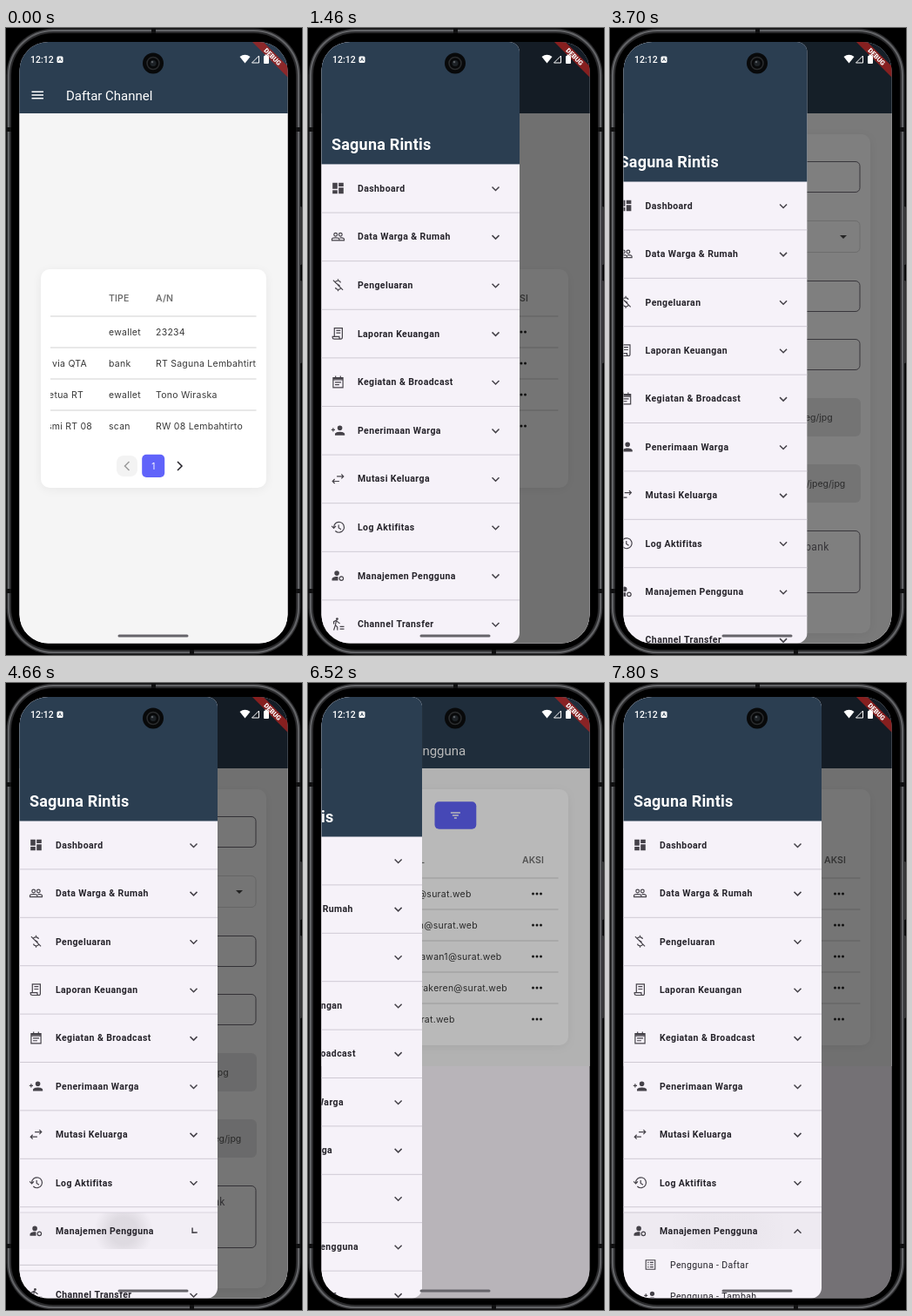
Recreate the animation shown at these times as an HTML page with a canvas. Size 340 by 720 pixels, loop 8 s.

```html
<!DOCTYPE html>
<html lang="id">
<head>
<meta charset="utf-8">
<style>
html, body { margin: 0; width: 100%; height: 100%; overflow: hidden; background: #000; }
canvas { display: block; width: 340px; height: 720px; }
</style>
</head>
<body>
<canvas id="stage"></canvas>
<script>
const LOOP = 8000;
const canvas = document.getElementById('stage');
const c = canvas.getContext('2d');
const dpr = window.devicePixelRatio || 1;
canvas.width = 340 * dpr;
canvas.height = 720 * dpr;

const SCREEN = { x: 15.5, y: 16, w: 308, h: 690.5, r: 33 };
const NAVY = '#2b3e51', INDIGO = '#6063fa', INK = '#25232a', LINE = '#cfcad4';
const ROBOTO = 'Roboto, sans-serif', INTER = 'Inter, sans-serif';
const ROW = 55.4, LIST_TOP = 176, DRAWER_W = 228, SUB = 36;

// Smooth interpolation through [time, value] keys; equal times make a hard cut.
function track(t, keys) {
  if (t < keys[0][0]) return keys[0][1];
  for (let i = keys.length - 1; i >= 0; i--) {
    if (t < keys[i][0]) continue;
    const next = keys[i + 1];
    if (!next) return keys[i][1];
    const u = (t - keys[i][0]) / (next[0] - keys[i][0]);
    return keys[i][1] + (next[1] - keys[i][1]) * u * u * (3 - 2 * u);
  }
}

const motion = {
  open: [[1140, 0], [1290, 1], [2860, 1], [3060, 0], [3700, 0], [3700, 0.928], [3840, 1],
    [5160, 1], [5420, 0], [6440, 0], [6600, 1]],
  scroll: [[1330, 0], [1440, 18], [2200, 18], [2720, 90], [3080, 90], [3080, 0],
    [4080, 0], [4260, 18], [5460, 18], [5460, 0], [6800, 0], [6930, 18]],
  stretch: [[1420, 0], [1460, 0.0038], [1560, 0.006], [1880, 0],
    [4240, 0], [4340, 0.005], [4560, 0], [6900, 0], [6960, 0.0058], [7080, 0.006], [7400, 0]],
  channels: [[1990, 0], [2110, 1], [3080, 1], [3080, 0]],
  users: [[4623, 0], [4740, 1], [5460, 1], [5460, 0], [7670, 0], [7790, 1]],
  channelTable: [[340, 0], [820, 77]],
  userTable: [[5870, 0], [6240, 116]],
  toForm: [[2860, 0], [3080, 1]],
  toUsers: [[5180, 0], [5460, 1]]
};

function box(x, y, w, h, r, fill, stroke) {
  c.beginPath();
  c.roundRect(x, y, w, h, r);
  if (fill) { c.fillStyle = fill; c.fill(); }
  if (stroke) { c.strokeStyle = stroke; c.lineWidth = 1; c.stroke(); }
}

function clipped(x, y, w, h, r, draw) {
  c.save();
  c.beginPath();
  c.roundRect(x, y, w, h, r);
  c.clip();
  draw();
  c.restore();
}

// y is the middle of the capitals.
function label(str, x, y, size, { font = ROBOTO, weight = 400, color = INK, gap = 0, align = 'left' } = {}) {
  c.font = `${weight} ${size}px ${font}`;
  c.letterSpacing = gap + 'px';
  c.textAlign = align;
  c.fillStyle = color;
  c.fillText(str, x, y + size * 0.355);
}

function path(d, x, y, { scale = 1, width = 1.5, color = INK, fill = false, turn = 0 } = {}) {
  c.save();
  c.translate(x, y);
  c.rotate(turn);
  c.scale(scale, scale);
  const p = new Path2D(d);
  if (fill) { c.fillStyle = color; c.fill(p); }
  else { c.strokeStyle = color; c.lineWidth = width; c.stroke(p); }
  c.restore();
}

const rule = (x, y, w, color) => { c.fillStyle = color; c.fillRect(x, y, w, 1); };
const disc = (x, y, r) => `M${x - r} ${y}a${r} ${r} 0 1 0 ${2 * r} 0a${r} ${r} 0 1 0 ${-2 * r} 0z`;

// Icons on a 24 unit grid: s is stroked, f is filled.
const icons = {
  dashboard: { f: 'M3 3h8v10H3zM13 3h8v6h-8zM3 15h8v6H3zM13 11h8v10h-8z' },
  people: { s: disc(8, 8.5, 2.7) + disc(16, 8.5, 2.7) + 'M2 18v-2c0-3 12-3 12 0v2zM14 18h8v-2c0-2-4-2.6-7-2' },
  spend: { s: 'M4 4l16 16M16 8c0-4-8-4-8-1M12 2v3M8 16c0 4 8 4 8 1M12 19v3M9 9l6 4' },
  report: { s: 'M6 17V3h13v15c0 4-5 4-5 0v-1H3v2c0 2 1 2 3 2h10M9 7h7M9 11h7' },
  event: { s: 'M4 5h16v16H4zM4 6.5h16M4 8.5h16M8 2v3M16 2v3M7 12.5h10M7 16.5h7' },
  addPerson: { s: 'M1 11h6M4 8v6', f: disc(15, 8, 4) + 'M7 20v-2c0-5 16-5 16 0v2z' },
  swap: { s: 'M21 8H10M17.5 4.5L21 8l-3.5 3.5M3 16h11M6.5 12.5L3 16l3.5 3.5' },
  history: { s: 'M5 12a8.5 8.5 0 1 1 2.5 6M1.5 10l3.5 3.5 3.5-3.5M13 8v5l4 2.5' },
  manage: { s: disc(17.5, 16.5, 3.2), f: disc(10, 8, 4) + 'M2 20v-2c0-4 7-5 10-4v6z' },
  transfer: { s: 'M5 12V8l4-2 3 3 3 2M9 7l-1.5 7L5 22M8 14l3 3v5M15 16h7M22 20h-7', f: disc(10.5, 3.5, 2) },
  list: { s: 'M4 4h16v16H4zM7 8h2M11 8h6M7 12h2M11 12h6M7 16h2M11 16h6' }
};

function icon(name, x, y, scale = 0.7) {
  const { s, f } = icons[name], o = 12 * scale, color = '#454249';
  if (s) path(s, x - o, y - o, { scale, width: 1.7, color });
  if (f) path(f, x - o, y - o, { scale, color, fill: true });
}

function card(y, h) {
  c.save();
  c.shadowColor = 'rgba(0,0,0,.06)';
  c.shadowBlur = 12 * dpr;
  c.shadowOffsetY = 2 * dpr;
  box(40, y, 259, h, 10, '#fff');
  c.restore();
}

function pageBase(title, menuBottom = 707) {
  c.fillStyle = '#fdf8ff';
  c.fillRect(15, 16, 309, 691);
  c.fillStyle = '#f5f5f5';
  c.fillRect(15, 98, 309, menuBottom - 98);
  c.fillStyle = NAVY;
  c.fillRect(15, 16, 309, 82);
  path('M0 -3.75h13.5M0 0h13.5M0 3.75h13.5', 29.5, 77, { color: '#fff' });
  label(title, 69, 77.5, 15, { color: '#fff' });
}

// Columns hold x, head, cells and an optional list of right edges.
function table(columns, headY, shift) {
  clipped(51, headY - 15, 236.5, 240, 0, () => {
    for (const { x, head, cells, ends } of columns) {
      label(head, x - shift, headY, 10.5, { font: INTER, weight: 600, color: '#707070', gap: 0.1 });
      cells.forEach((cell, i) => {
        const y = headY + 39 + i * 36;
        if (cell === '...') {
          for (let k = 0; k < 3; k++) path(disc(0, 0, 1.5), x - shift + 12.5 + k * 4.5, y, { fill: true, color: '#222' });
        } else {
          label(cell, (ends ? ends[i] : x) - shift, y, 10.5,
            { font: INTER, color: '#383838', gap: 0.25, align: ends ? 'right' : 'left' });
        }
      });
    }
    columns[0].cells.forEach((_, i) => rule(51, headY + 20.5 + i * 36, 237, '#d2d2d2'));
  });
}

const dots = n => Array(n).fill('...');

const channelColumns = [
  { x: 5, head: 'NAMA', cells: ['', 'Transfer via QTA', 'Dompet Ketua RT', 'Scan Resmi RT 08'], ends: [90, 93, 89, 99] },
  { x: 118, head: 'TIPE', cells: ['ewallet', 'bank', 'ewallet', 'scan'] },
  { x: 172, head: 'A/N', cells: ['23234', 'RT Saguna Lembahtirto', 'Tono Wiraska', 'RW 08 Lembahtirto'] },
  { x: 305, head: 'AKSI', cells: dots(4) }
];

const userColumns = [
  { x: 51, head: 'NO', cells: ['1', '2', '3', '4', '5'] },
  { x: 79, head: 'NAMA', cells: ['lulun', 'Tarwin', 'kasjhfaws', 'Sandya Wira Kusumanto', 'tes'] },
  { x: 217, head: 'EMAIL', cells: ['lulun@surat.web', 'tarwin@surat.web', 'bakulawan1@surat.web', 'sandyakeren@surat.web', 'k@surat.web'] },
  { x: 362, head: 'AKSI', cells: dots(5) }
];

function channelPage(t) {
  pageBase('Daftar Channel');
  card(277, 251);
  table(channelColumns, 310, track(t, motion.channelTable));
  box(127, 491, 24, 24, 8, '#f3f3f3');
  path('M3 -5L-2 0L3 5', 138.5, 503, { color: '#9b9b9b' });
  box(156.2, 489.7, 26, 26.2, 5, INDIGO);
  label('1', 169.2, 503, 10, { font: INTER, color: '#fff', align: 'center' });
  path('M-3 -5L2 0L-3 5', 200, 503);
}

function userPage(t) {
  pageBase('Daftar Pengguna', 440);
  card(122, 294);
  box(145.5, 136.3, 47.8, 31.4, 5, INDIGO);
  path('M-5.5 -3h11M-3.5 0h7M-1.5 3h3', 169.4, 152, { color: '#fff', width: 1.3 });
  table(userColumns, 203, track(t, motion.userTable));
}

function formPage() {
  pageBase('Tambah Channel');
  card(122, 573);
  const gray = { color: '#6b6870', gap: 0.37 };
  const field = (name, y, h, hint, hintY = y + 18) => {
    label(name, 52, y - 12, 10.5, { weight: 500, font: INTER });
    box(52.5, y + 0.5, 234.5, h, 5, '#fff', '#706c76');
    if (hint) label(hint, 64, hintY, 12, gray);
  };
  const upload = (name, y, hint) => {
    label(name, 52, y - 12, 10.5, { weight: 500, font: INTER });
    box(52, y, 236, 44, 6, '#e9e9ea');
    label(hint, 169, y + 22, 10.5, { font: INTER, color: '#555', align: 'center' });
  };
  field('Nama Channel', 153, 35, 'Contoh: Bank, Scan, Kas RT', 171.5);
  label('Tipe Channel', 52, 209, 10.5, { weight: 500, font: INTER });
  box(52.5, 221.5, 234.5, 36, 5, '#fff', '#dcdcdc');
  path('M-4 -2h8l-4 4z', 268, 240, { fill: true, color: '#4a4a4a' });
  field('Nomor Rekening / Akun', 290, 35);
  field('Nama Pemilik (A/N)', 357, 35);
  upload('Foto Kode', 425, 'Upload foto (jika ada) png/jpeg/jpg');
  upload('Thumbnail', 501, 'Upload thumbnail (jika ada) png/jpeg/jpg');
  field('Catatan (Opsional)', 577, 71, 'Contoh: Transfer hanya dari bank', 595.5);
}

function enter(p, draw) {
  if (p <= 0) return;
  const s = 0.9 + 0.1 * p;
  c.save();
  c.globalAlpha = p;
  c.translate(169, 361);
  c.scale(s, s);
  c.translate(-169, -361);
  draw();
  c.restore();
}

const menu = [
  ['dashboard', 'Dashboard'], ['people', 'Data Warga & Rumah'], ['spend', 'Pengeluaran'],
  ['report', 'Laporan Keuangan'], ['event', 'Kegiatan & Broadcast'], ['addPerson', 'Penerimaan Warga'],
  ['swap', 'Mutasi Keluarga'], ['history', 'Log Aktifitas'],
  ['manage', 'Manajemen Pengguna', 'users', [['list', 'Pengguna - Daftar'], ['addPerson', 'Pengguna - Tambah']]],
  ['transfer', 'Channel Transfer', 'channels', [['list', 'Channel - Daftar'], ['addPerson', 'Channel - Tambah']]]
];

const taps = [
  { at: 1960, row: 9 }, { at: 2820, row: 9, sub: 1 },
  { at: 4600, row: 8 }, { at: 4900, row: 8, sub: 0 }, { at: 7640, row: 8 }
];

function ripple(t, row, top) {
  for (const tap of taps) {
    const age = t - tap.at;
    if (tap.row !== row || age < 0 || age > 400) continue;
    const isSub = tap.sub !== undefined;
    const y = isSub ? top + 48.8 + tap.sub * SUB : top + 6.8;
    const h = isSub ? SUB : 42;
    clipped(15, y, DRAWER_W, h, 0, () => {
      c.fillStyle = `rgba(29,27,32,${0.035 * Math.min(1, age / 150) * Math.min(1, (400 - age) / 100)})`;
      c.fillRect(15, y, DRAWER_W, h);
      const r = 12 + age * 0.36;
      const g = c.createRadialGradient(135, y + h / 2, r * 0.45, 135, y + h / 2, r);
      g.addColorStop(0, `rgba(29,27,32,${Math.max(0, 0.14 * (1 - age / 180))})`);
      g.addColorStop(1, 'rgba(29,27,32,0)');
      c.fillStyle = g;
      c.fillRect(15, y, DRAWER_W, h);
    });
  }
}

function drawer(t, open) {
  const dx = -DRAWER_W * (1 - open);
  c.save();
  c.translate(dx, 0);
  clipped(15, 16, DRAWER_W, 690.5, [0, 12, 12, 0], () => {
    c.fillStyle = '#f6f2f9';
    c.fillRect(15, 16, DRAWER_W, 691);
    c.translate(0, 706);
    c.scale(1, 1 + track(t, motion.stretch));
    c.translate(0, -706 - track(t, motion.scroll));
    c.fillStyle = NAVY;
    c.fillRect(15, 0, DRAWER_W, LIST_TOP + 0.5);
    label('Saguna Rintis', 27, 153.5, 18, { weight: 700, color: '#fff', gap: 0.2 });

    let top = LIST_TOP;
    menu.forEach(([glyph, name, key, subs], i) => {
      const p = key ? track(t, motion[key]) : 0;
      const extra = p * SUB * 2, y = top + 28;
      ripple(t, i, top);
      icon(glyph, 34.5, y);
      label(name, 57, y, 10.5, { weight: 700, gap: 0.4 });
      path('M-4 -2L0 2L4 -2', 215.5, y + 0.5, { turn: p * Math.PI, color: '#454249' });
      if (p > 0) {
        clipped(15, top + 48.8, DRAWER_W, extra, 0, () => subs.forEach(([mark, text], k) => {
          const sy = top + 48.8 + (extra - SUB * 2) / 2 + SUB * (k + 0.5);
          icon(mark, 46.5, sy, 0.66);
          label(text, 69, sy, 10.5, { gap: 0.37 });
        }));
        c.globalAlpha = Math.min(1, p * 3);
        rule(15, top + 6.3, DRAWER_W, LINE);
        rule(15, top + 48.8 + extra, DRAWER_W, '#bdb8c2');
        c.globalAlpha = 1;
      }
      top += ROW + extra;
      rule(15, top, DRAWER_W, LINE);
    });
  });
  c.restore();
}

function debugBanner() {
  c.save();
  c.translate(306.3, 33);
  c.rotate(Math.PI / 4);
  c.fillStyle = 'rgba(172,32,30,.75)';
  c.fillRect(-45, -4.5, 90, 9);
  label('DEBUG', 0, 0, 7.6, { weight: 900, color: '#fff', align: 'center' });
  c.restore();
}

function statusBar() {
  label('12:12', 28, 36, 10.5, { weight: 500, color: '#fff' });
  box(58.5, 32.5, 7, 7.5, 1.5, '#fff');
  label('A', 62, 36.3, 6, { weight: 700, color: NAVY, align: 'center' });
  path('M0 5L-6 -2.5Q0 -7 6 -2.5z', 274.5, 35.5, { fill: true, color: '#fff' });
  path('M8 0v8h-8z', 282.5, 32, { color: '#fff', width: 1 });
  box(296, 32, 6, 9, 1, '#fff');
  box(297.5, 30.5, 3, 2, 0, '#fff');
}

function phoneBody() {
  c.fillStyle = '#000';
  c.fillRect(0, 0, 340, 720);
  box(337, 205, 2.5, 67, 1, '#58595b');
  box(337, 290, 2.5, 95, 1, '#58595b');
  box(0.5, 0.5, 338, 719, 54, '#2a2a2c');
  c.beginPath();
  c.roundRect(3, 3, 333, 714, 51.5);
  c.strokeStyle = '#626366';
  c.lineWidth = 2.2;
  c.stroke();
  box(6, 6, 327, 708, 48, '#000');
  c.fillStyle = '#101011';
  for (const y of [114, 644]) {
    c.fillRect(0, y, 6, 5);
    c.fillRect(333, y, 6, 5);
  }
  c.fillRect(167, 0, 5, 6);
  c.fillRect(211, 714, 5, 6);
}

function camera() {
  path(disc(0, 0, 12), 169, 40.5, { fill: true, color: '#08090a' });
  path(disc(0, 0, 7), 169, 40.5, { color: '#2a2c2e', width: 1.5 });
  path(disc(0, 0, 3.5), 169, 40.5, { fill: true, color: '#1d2226' });
  path(disc(0, 0, 1.3), 168, 39, { fill: true, color: '#565b5f' });
}

function draw(t) {
  c.setTransform(dpr, 0, 0, dpr, 0, 0);
  phoneBody();
  clipped(SCREEN.x, SCREEN.y, SCREEN.w, SCREEN.h, SCREEN.r, () => {
    const toForm = track(t, motion.toForm), toUsers = track(t, motion.toUsers);
    if (toForm < 1) channelPage(t);
    if (toUsers < 1) enter(toForm, formPage);
    enter(toUsers, () => userPage(t));
    const open = track(t, motion.open);
    if (open > 0) {
      c.fillStyle = `rgba(0,0,0,${0.54 * open})`;
      c.fillRect(15, 16, 309, 691);
      drawer(t, open);
    }
    debugBanner();
    statusBar();
    box(128.5, 696.5, 81, 3, 1.5, '#66646a');
  });
  camera();
}

function tick(now) {
  draw(now % LOOP);
  requestAnimationFrame(tick);
}
draw(0);
requestAnimationFrame(tick);
</script>
</body>
</html>
```
